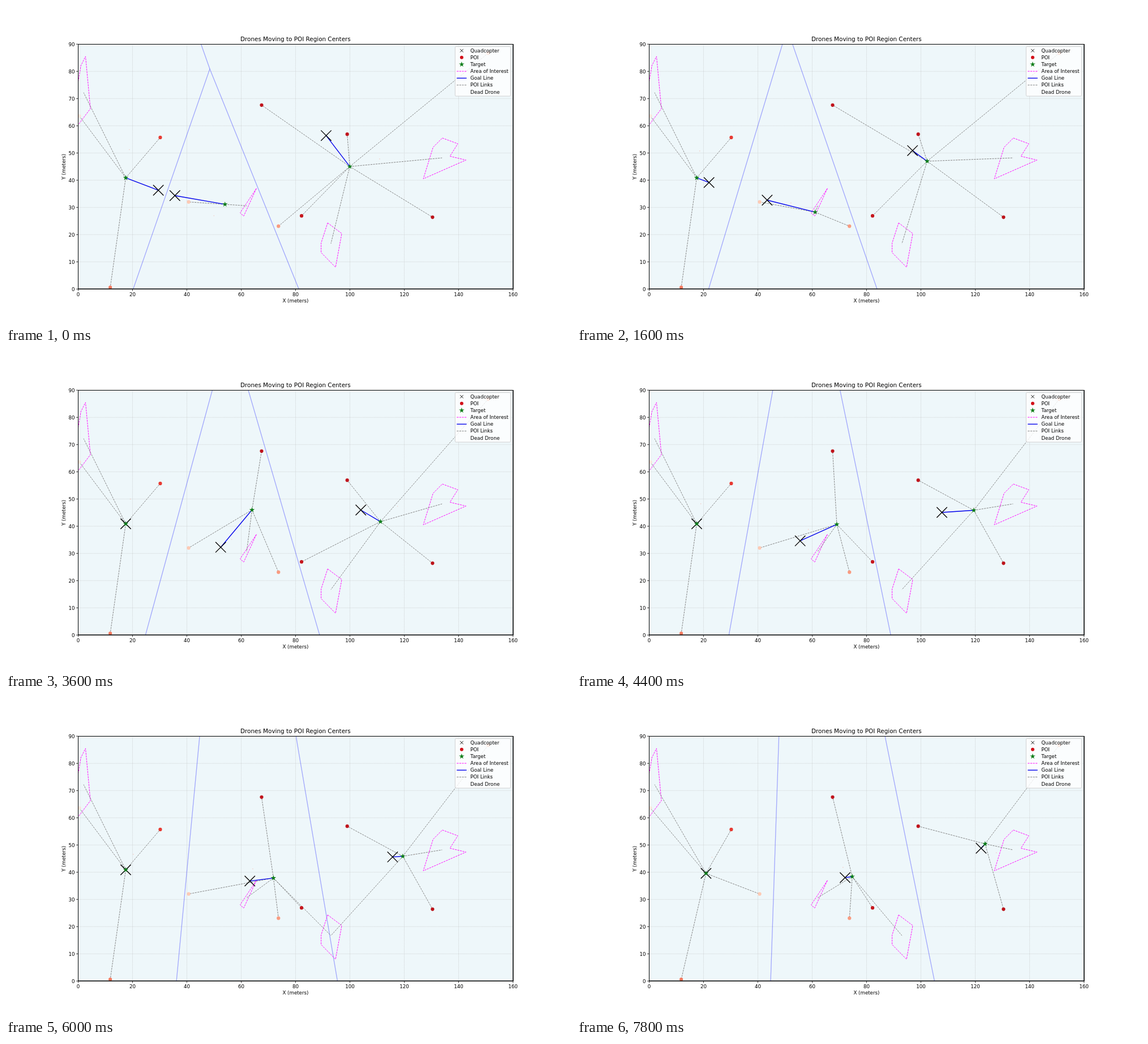
An HTML page that plays this animation: 998 by 561 pixels, repeating every 8 s.

```html
<!DOCTYPE html>
<html lang="en">
<head>
<meta charset="utf-8">
<title>Drones Moving to POI Region Centers</title>
<style>
  html, body { margin: 0; width: 100%; height: 100%; overflow: hidden; background: #fff; }
  svg { display: block; width: 998px; height: 561px; }
  text { font: 8.66px "DejaVu Sans", sans-serif; fill: #000; }
  .title { font-size: 10.4px; }
  .mid { text-anchor: middle; }
  .end { text-anchor: end; }
  path { fill: none; }
  .grid { stroke: #b0b0b0; stroke-opacity: .75; stroke-width: .8; stroke-dasharray: .8 1.1; }
  .tick { stroke: #000; stroke-width: .8; }
  .edge { stroke: #00f; stroke-opacity: .18; stroke-width: 1.3; }
  .area { stroke: #f0f; stroke-width: .95; stroke-dasharray: 3.2 1.4; }
  .link { stroke: #808080; stroke-width: .95; stroke-dasharray: 3.2 1.4; }
  .goal { stroke: #0000eb; stroke-width: 1.35; }
  .drone { stroke: #000; stroke-width: 1.35; }
  .key { stroke: #000; stroke-width: .9; }
  .star { fill: #0b7d18; }
  .center { fill: #f98870; fill-opacity: .5; }
</style>
</head>
<body>
<svg viewBox="0 0 998 561">
  <clipPath id="axes"><rect x="127.5" y="67.3" width="768" height="432"/></clipPath>
  <rect x="127.5" y="67.3" width="768" height="432" fill="#eef7fa"/>
  <g id="grid"></g>
  <g id="plot" clip-path="url(#axes)"></g>
  <g id="frame"></g>
  <g id="legend"></g>
</svg>
<script>
const STEP = 200, STEPS = 40;
const W = 160, H = 90, SCALE = 4.8;

// Points of interest: position, weight, colour
const pois = [
  [0.4, 63.6, 2.4, '#fee6da'], [30.2, 55.7, 14, '#e73a32'], [11.8, 0.6, 10.4, '#f4795f'],
  [40.65, 32, 5.5, '#fdcab5'], [73.7, 23.1, 8.2, '#f99b80'], [67.5, 67.6, 18.8, '#c0151d'],
  [82.2, 26.9, 16.1, '#c6171d'], [99, 56.9, 17, '#c0151d'], [130.4, 26.4, 17, '#bc141a'],
  [150.9, 86.7, 8.6, '#fc9576'],
].map(([x, y, weight, color]) => ({ center: [x, y], weight, color, points: [[x, y]] }));

// Areas of interest: centre, weight, outline
const areas = [
  [[2, 72.2], 5, [[-1, 70.5], [1, 82.1], [2.7, 85.5], [4.5, 66.3], [-1, 59]]],
  [[62, 30.6], 9.2, [[65.6, 37], [59.6, 28], [60.9, 26.8]]],
  [[93, 16.7], 7.7, [[91.8, 24.3], [97, 20.4], [94.7, 8], [89.4, 13.4], [89.4, 16.9]]],
  [[133.9, 48.2], 6.6, [[134, 55.5], [139.7, 53.4], [136.8, 48.8], [142.7, 47.4], [127, 40.5], [130.6, 52.1]]],
].map(([center, weight, points]) => ({ center, weight, points }));

const goals = [...areas, ...pois];
const start = [[30.44, 35.95], [34.6, 34.5], [90.64, 57.2]];

const $ = id => document.getElementById(id);
const sx = x => 127.5 + x * SCALE;
const sy = y => 499.3 - y * SCALE;
const fix = n => n.toFixed(2);
const at = ([x, y]) => `${fix(sx(x))},${fix(sy(y))}`;
const path = (cls, d) => `<path class="${cls}" d="${d}"/>`;
const line = (cls, a, b) => path(cls, `M${at(a)}L${at(b)}`);
const polygon = (cls, pts) => path(cls, `M${pts.map(at).join('L')}Z`);
const disc = (x, y, r, attr) => `<circle cx="${fix(x)}" cy="${fix(y)}" r="${r}" ${attr}/>`;
const label = (x, y, text, cls = '') => `<text x="${x}" y="${y}" class="${cls}">${text}</text>`;
const cross = (cls, x, y, r) => path(cls, `M${x - r},${y - r}l${2 * r},${2 * r}M${x - r},${y + r}l${2 * r},${-2 * r}`);

function star(x, y, r = 5) {
  const pts = Array.from({ length: 10 }, (_, i) => {
    const a = i * Math.PI / 5, q = i % 2 ? r * .382 : r;
    return `${fix(x + q * Math.sin(a))},${fix(y - q * Math.cos(a))}`;
  });
  return path('star', `M${pts.join('L')}Z`);
}

const dist = (a, b) => Math.hypot(a[0] - b[0], a[1] - b[1]);

function nearest(p, drones) {
  const d = drones.map(q => dist(p, q));
  return d.indexOf(Math.min(...d));
}

// Voronoi cell of one drone inside the axes grown by pad
function cell(i, drones, pad) {
  let poly = [[-pad, -pad], [W + pad, -pad], [W + pad, H + pad], [-pad, H + pad]];
  const p = drones[i];
  drones.forEach((q, j) => {
    if (j === i) return;
    const side = v => dist(v, q) ** 2 - dist(v, p) ** 2;
    poly = poly.flatMap((a, k) => {
      const b = poly[(k + 1) % poly.length], sa = side(a), sb = side(b);
      const out = sa >= 0 ? [a] : [];
      if (sa * sb < 0) {
        const t = sa / (sa - sb);
        out.push([a[0] + t * (b[0] - a[0]), a[1] + t * (b[1] - a[1])]);
      }
      return out;
    });
  });
  return poly;
}

function centroid(poly) {
  let area = 0, x = 0, y = 0;
  poly.forEach((a, k) => {
    const b = poly[(k + 1) % poly.length], c = a[0] * b[1] - b[0] * a[1];
    area += c;
    x += c * (a[0] + b[0]);
    y += c * (a[1] + b[1]);
  });
  return [x / (3 * area), y / (3 * area)];
}

function weightedMean(members) {
  const total = members.reduce((s, m) => s + m.weight, 0);
  return [0, 1].map(k => members.reduce((s, m) => s + m.weight * m.center[k], 0) / total);
}

// Each drone flies one metre per step and stops on its target
function moveTo(p, target) {
  const d = dist(p, target);
  return d <= 1 ? target : p.map((v, k) => v + (target[k] - v) / d);
}

function simulate() {
  const states = [];
  let drones = start;
  for (let n = 0; n < STEPS; n++) {
    const before = drones;
    const members = before.map((_, i) =>
      goals.filter(g => g.points.some(p => nearest(p, before) === i)));
    const targets = members.map(weightedMean);
    drones = before.map((p, i) => moveTo(p, targets[i]));
    states.push({ before, members, targets, drones });
  }
  return states;
}

function render({ before, members, targets, drones }) {
  const each = fn => drones.map((p, i) => fn(p, i)).join('');
  const mark = ([x, y], fn) => fn(sx(x), sy(y));
  return each((_, i) => polygon('edge', cell(i, before, 60)))
    + each((_, i) => mark(centroid(cell(i, before, 0)), (x, y) => disc(x, y, .7, 'class="center"')))
    + areas.map(a => polygon('area', a.points)).join('')
    + each((_, i) => members[i].map(m => line('link', targets[i], m.center)).join(''))
    + pois.map(p => mark(p.center, (x, y) => disc(x, y, 3.1, `fill="${p.color}"`))).join('')
    + each((p, i) => line('goal', p, targets[i]))
    + each(p => mark(p, (x, y) => cross('drone', x, y, 9.2)))
    + each((_, i) => mark(targets[i], (x, y) => star(x, y)));
}

function drawAxes() {
  let grid = '', frame = '';
  for (let x = 0; x <= W; x += 20) {
    grid += line('grid', [x, 0], [x, H]);
    frame += path('tick', `M${sx(x)},499.3v3.4`) + label(sx(x), 512.3, x, 'mid');
  }
  for (let y = 0; y <= H; y += 10) {
    grid += line('grid', [0, y], [W, y]);
    frame += path('tick', `M127.5,${sy(y)}h-3.4`) + label(121.6, sy(y) + 3.2, y, 'end');
  }
  frame += '<path d="M127.5,500V67.5H896" stroke="#000"/>'
    + '<path d="M127,499.3H895.7V67" stroke="#000" stroke-width="1.6"/>'
    + label(511.4, 62.3, 'Drones Moving to POI Region Centers', 'mid title')
    + label(511.4, 523.4, 'X (meters)', 'mid')
    + `<g transform="translate(104.6 283.5) rotate(-90)">${label(0, 0, 'Y (meters)', 'mid')}</g>`;
  $('grid').innerHTML = grid;
  $('frame').innerHTML = frame;
}

function drawLegend() {
  const x = 804.9, stroke = cls => y => path(cls, `M796.2,${y}h17.4`);
  const rows = [
    ['Quadcopter', y => cross('key', x, y, 2.8)],
    ['POI', y => disc(x, y, 3, 'fill="#d2101a"')],
    ['Target', y => star(x, y)],
    ['Area of Interest', stroke('area')],
    ['Goal Line', stroke('goal')],
    ['POI Links', stroke('link')],
    ['Dead Drone', () => ''],
  ];
  $('legend').innerHTML =
    '<rect x="793.3" y="71.6" width="98" height="87.4" rx="1.8" fill="#fff" fill-opacity=".8" stroke="#ccc" stroke-width=".9"/>'
    + rows.map(([name, handle], i) => {
      const y = 78.7 + i * 12.15;
      return handle(y) + label(820.3, fix(y + 3), name);
    }).join('');
}

drawAxes();
drawLegend();
const states = simulate();
const begin = performance.now();
let shown = -1;

function tick() {
  const n = Math.floor(Math.max(0, performance.now() - begin) / STEP) % STEPS;
  if (n !== shown) $('plot').innerHTML = render(states[shown = n]);
  requestAnimationFrame(tick);
}
tick();
</script>
</body>
</html>
```
